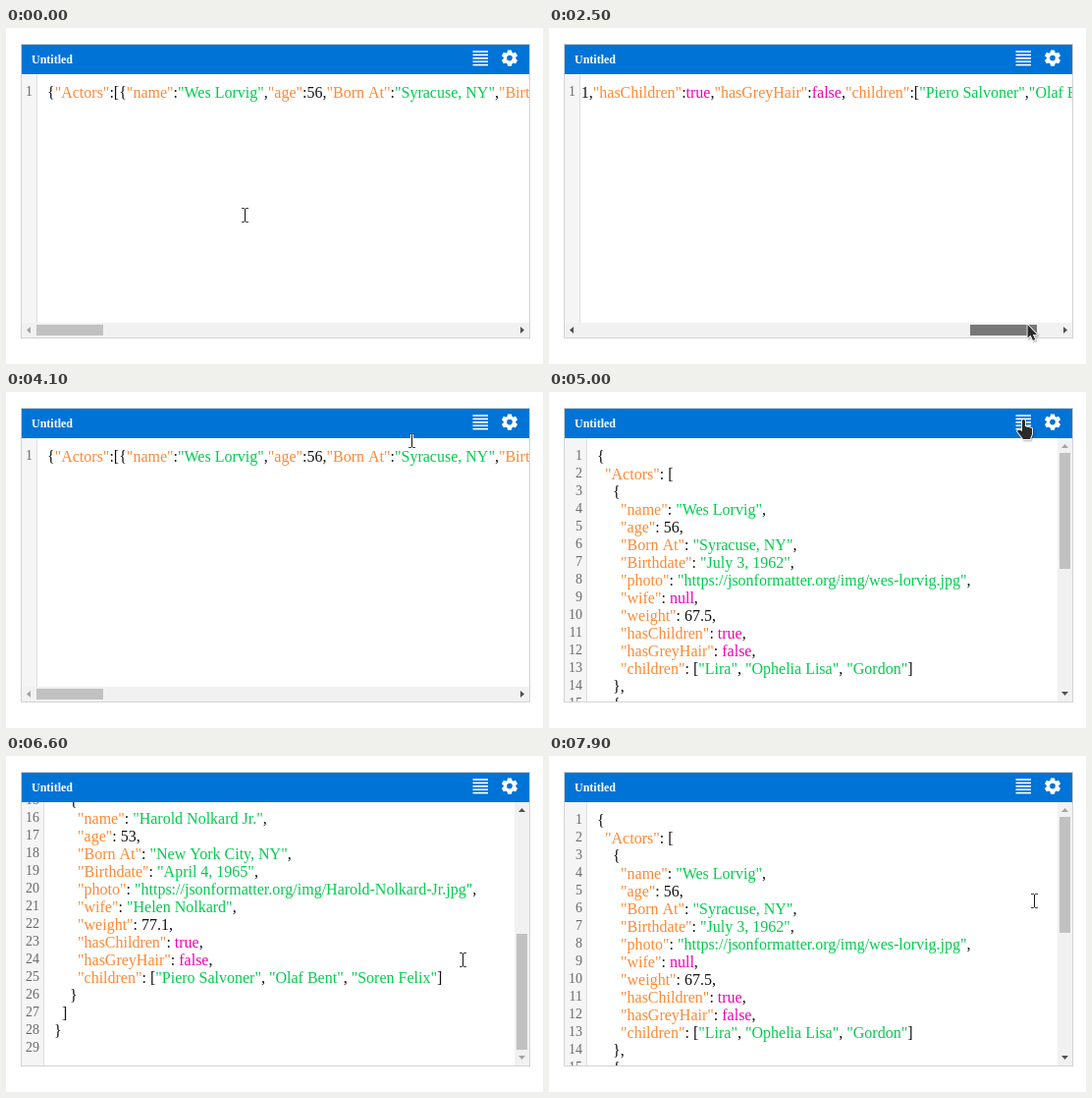
Animation of 547x342 px, one loop 8000 ms. Source, as an HTML page with a canvas:

```html
<!DOCTYPE html>
<html lang="en">
<head>
<meta charset="utf-8">
<title>JSON editor</title>
<style>
html, body { margin: 0; width: 100%; height: 100%; overflow: hidden; background: #fff; }
canvas { display: block; width: 547px; height: 342px; }
</style>
</head>
<body>
<canvas id="stage"></canvas>
<script>
const LOOP = 8000, STEP = 100;
const W = 547, H = 342;
const SERIF = '"Liberation Serif", Times, serif';
const COLORS = { key: '#ff8833', text: '#00cc4d', word: '#f000b4', plain: '#111' };
const THUMB = { idle: '#c1c1c1', hover: '#a8a8a8', held: '#787878' };

const canvas = document.getElementById('stage');
const ctx = canvas.getContext('2d');
const dpr = window.devicePixelRatio || 1;
canvas.width = W * dpr;
canvas.height = H * dpr;

const person = (name, age, home, born, photo, wife, weight, children) => ({
  name, age, 'Born At': home, Birthdate: born,
  photo: 'https://jsonformatter.org/img/' + photo + '.jpg',
  wife, weight, hasChildren: true, hasGreyHair: false, children
});
const data = {
  Actors: [
    person('Wes Lorvig', 56, 'Syracuse, NY', 'July 3, 1962', 'wes-lorvig',
      null, 67.5, ['Lira', 'Ophelia Lisa', 'Gordon']),
    person('Harold Nolkard Jr.', 53, 'New York City, NY', 'April 4, 1965', 'Harold-Nolkard-Jr',
      'Helen Nolkard', 77.1, ['Piero Salvoner', 'Olaf Bent', 'Soren Felix'])
  ]
};

// Splits a line of JSON into coloured runs.
function tokenize(line) {
  const re = /("[^"]*")(?=:)|("[^"]*")|(true|false|null)|([^"tfn]+)/g;
  return [...line.matchAll(re)].map(m => ({
    s: m[0],
    color: COLORS[m[1] ? 'key' : m[2] ? 'text' : m[3] ? 'word' : 'plain']
  }));
}
const compact = [tokenize(JSON.stringify(data))];
const pretty = JSON.stringify(data, null, 2)
  .replace(/\[\s+"[^\]]*"\s+\]/g, m => m.replace(/\n\s*/g, ' ').replace('[ ', '[').replace(' ]', ']'))
  .split('\n').map(tokenize).concat([[]]);

const clamp = (v, lo, hi) => Math.min(hi, Math.max(lo, v));

// Quick start, long settle.
function ease(u) {
  const v = u ** 0.75;
  return v * v * (3 - 2 * v);
}
// Each move is [start, duration, ...values to reach].
function follow(from, moves, t) {
  return moves.reduce((at, [start, span, ...to]) => {
    const k = ease(clamp((t - start) / span, 0, 1));
    return at.map((v, i) => v + (to[i] - v) * k);
  }, from).map(Math.round);
}
const pointerAt = t => follow([243, 190], [
  [300, 500, 76, 303],
  [1200, 800, 526, 302],
  [2400, 1000, 57, 302],
  [3700, 400, 413, 49],
  [4100, 500, 483, 31],
  [5600, 700, 465, 207],
  [7800, 100, 494, 147]
], t);
// The drag runs past both ends of the bar.
const thumbAt = t => clamp(follow([31], [[1200, 868, 460], [2400, 1282, -60]], t)[0], 31, 450);
const scrollAt = t => follow([0], [[6300, 300, 272], [7289, 311, 0]], t)[0];

function rect(x, y, w, h, color) {
  ctx.fillStyle = color;
  ctx.fillRect(x, y, w, h);
}
function poly(points, color) {
  ctx.beginPath();
  points.forEach(p => ctx.lineTo(p[0], p[1]));
  ctx.closePath();
  ctx.fillStyle = color;
  ctx.fill();
}
function clipped(x, y, w, h, draw) {
  ctx.save();
  ctx.beginPath();
  ctx.rect(x, y, w, h);
  ctx.clip();
  draw();
  ctx.restore();
}
// Triangle with its tip at x, y, pointing left before it is turned.
function scrollArrow(x, y, turn, on) {
  ctx.save();
  ctx.translate(x, y);
  ctx.rotate(turn * Math.PI / 2);
  poly([[0, 0], [4, -3.5], [4, 3.5]], on ? '#505050' : '#a3a3a3');
  ctx.restore();
}

function drawHeader() {
  rect(16, 17, 517, 30, '#0073d7');
  ctx.font = 'bold 12px ' + SERIF;
  ctx.fillStyle = '#fff';
  ctx.fillText('Untitled', 26, 36);
  for (let i = 0; i < 5; i++) rect(475.5, 23.2 + i * 3.4, 15.5, 1.6, '#fff');
  drawGear(513, 30.6);
}
function drawGear(x, y) {
  ctx.save();
  ctx.translate(x, y);
  ctx.fillStyle = '#fff';
  ctx.beginPath();
  ctx.arc(0, 0, 6.2, 0, 7);
  ctx.moveTo(2.9, 0);
  ctx.arc(0, 0, 2.9, 0, 7, true);
  ctx.fill('evenodd');
  for (let i = 0; i < 6; i++) {
    poly([[-2.7, -5.2], [-1.9, -8.2], [1.9, -8.2], [2.7, -5.2]], '#fff');
    ctx.rotate(Math.PI / 3);
  }
  ctx.restore();
}

function drawText(lines, gutter, left, top, bottom, right) {
  rect(16, 47, gutter - 16, bottom - 47, '#f5f5f5');
  rect(gutter, 47, 1, bottom - 47, '#ddd');
  clipped(16, 47, right - 16, bottom - 47, () => {
    ctx.font = '14px ' + SERIF;
    ctx.fillStyle = '#6b6b6b';
    ctx.textAlign = 'right';
    lines.forEach((_, i) => ctx.fillText(i + 1, gutter - 4, 69 + i * 18 - top));
    ctx.textAlign = 'left';
  });
  clipped(gutter + 1, 47, right - gutter - 1, bottom - 47, () => {
    ctx.font = '16px ' + SERIF;
    lines.forEach((line, i) => {
      let x = gutter + 11 - left;
      for (const run of line) {
        ctx.fillStyle = run.color;
        ctx.fillText(run.s, x, 71 + i * 18 - top);
        x += ctx.measureText(run.s).width;
      }
    });
  });
}

function drawCompact(t) {
  const x = thumbAt(t);
  const held = t >= 1100 && t < 3800;
  const state = held ? 'held' : pointerAt(t)[1] >= 300 ? 'hover' : 'idle';
  drawText(compact, 31, (x - 31) * 7.556, 0, 300, 533);
  rect(16, 300, 517, 15, '#f1f1f1');
  rect(x, 302, 68, 11, THUMB[state]);
  scrollArrow(21, 307.5, 0, x > 31);
  scrollArrow(528, 307.5, 2, x < 450);
}
function drawPretty(t) {
  const top = scrollAt(t);
  drawText(pretty, 38, 0, top, 315, 518);
  rect(518, 47, 15, 268, '#f1f1f1');
  rect(520, 62 + Math.round(top * 117 / 267), 11, 118, THUMB.idle);
  scrollArrow(525.5, 53, 1, top > 0);
  scrollArrow(525.5, 309, 3, top < 272);
}

function drawBeam() {
  rect(-1, -6, 3, 13, '#fff');
  rect(0, -6, 1, 13, '#111');
  for (const y of [-7, 7]) {
    rect(-3, y, 3, 1, '#444');
    rect(1, y, 3, 1, '#444');
  }
}
function outlined(path) {
  const shape = new Path2D(path);
  ctx.lineJoin = 'round';
  ctx.lineWidth = 1.8;
  ctx.strokeStyle = '#fff';
  ctx.shadowColor = 'rgba(0,0,0,.35)';
  ctx.shadowBlur = 2 * dpr;
  ctx.shadowOffsetX = ctx.shadowOffsetY = dpr;
  ctx.stroke(shape);
  ctx.shadowColor = 'transparent';
  ctx.fillStyle = '#2a2a2a';
  ctx.fill(shape);
}
function drawPointer(t) {
  const [x, y] = pointerAt(t);
  ctx.save();
  ctx.translate(x, y);
  if (y < 47 && x > 473) {
    outlined('M-1 -2Q0 -4 2 -2V4L9 6V12L7 17H0L-6 9Q-5 6 -1 9Z');
  } else if (y < 47 || y >= 300) {
    outlined('M.5 0V13.5L3.5 10.8L6 16L8.2 15L5.9 9.9H10Z');
  } else {
    drawBeam();
  }
  ctx.restore();
}

function draw(t) {
  ctx.setTransform(dpr, 0, 0, dpr, 0, 0);
  rect(0, 0, W, H, '#fff');
  rect(15, 16, 519, 300, '#d3d3d3');
  rect(16, 17, 517, 298, '#fff');
  drawHeader();
  (t < 5000 ? drawCompact : drawPretty)(t);
  drawPointer(t);
}

const start = performance.now();
function tick() {
  const t = (performance.now() - start) % LOOP;
  draw(Math.floor(t / STEP) * STEP);
  requestAnimationFrame(tick);
}
tick();
</script>
</body>
</html>
```
